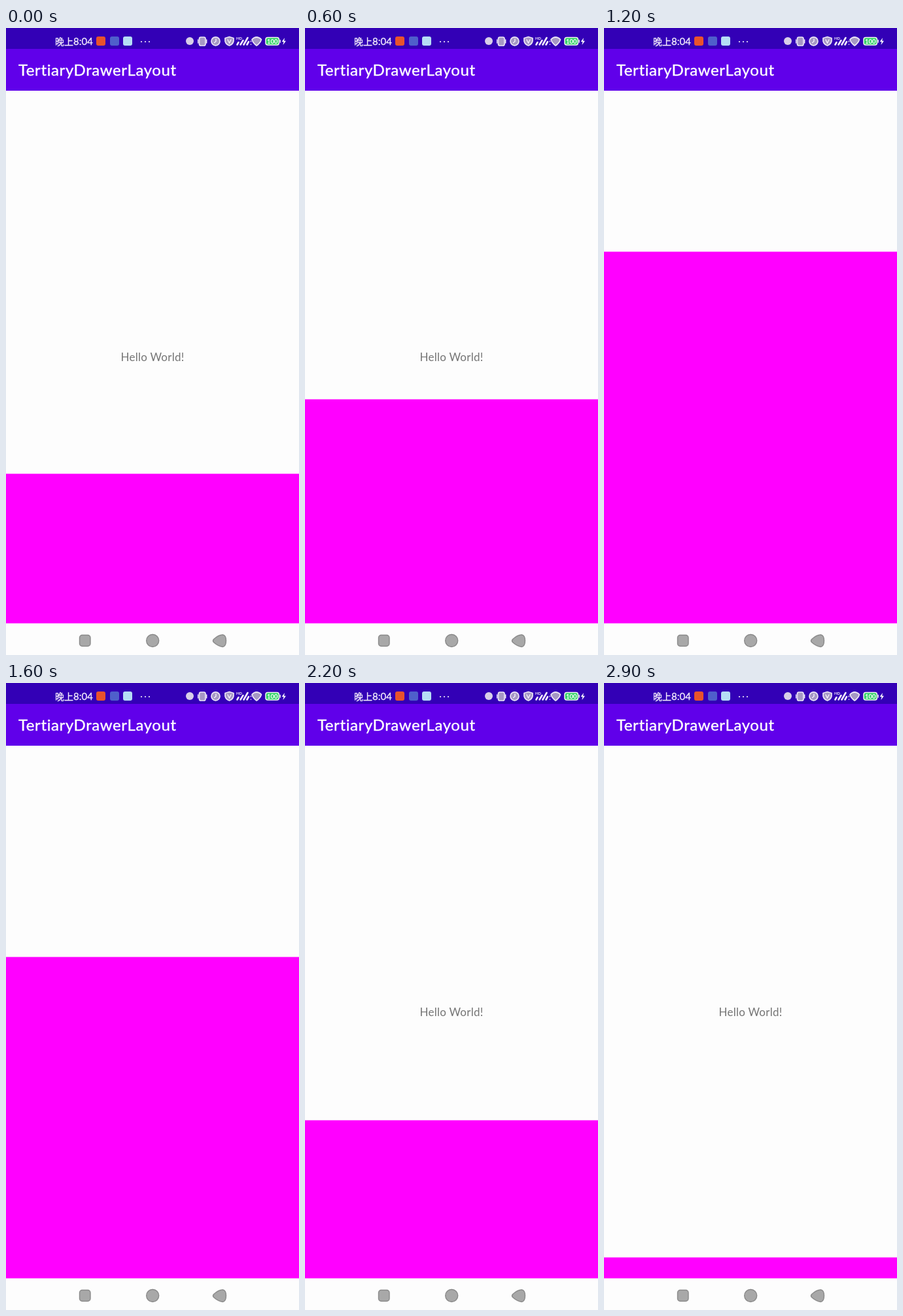
An HTML page for the animation above (3 s loop, 448 by 960 pixels).

```html
<!DOCTYPE html>
<html lang="en">
<head>
<meta charset="utf-8">
<title>TertiaryDrawerLayout</title>
<style>
  html, body { margin: 0; width: 100%; height: 100%; overflow: hidden; background: #fdfdfd; }
  svg { display: block; width: 448px; height: 960px; font-family: Lato, "Noto Sans CJK SC", "Noto Sans CJK", sans-serif; }
  .title { font-size: 24px; letter-spacing: .6px; fill: #fff; stroke: #fff; stroke-width: .4px; }
  .hello { font-size: 17px; letter-spacing: .25px; fill: #757575; text-anchor: middle; }
  .clock { font-size: 15px; fill: #f4effc; stroke: #f4effc; stroke-width: .3px; }
  .icon { fill: #a698c4; stroke: #ece6f7; stroke-width: 1.7; stroke-linejoin: round; }
  .line { fill: none; stroke: #f4effc; stroke-width: 1.4; stroke-linecap: round; }
  .bars { stroke-width: 2.6; }
  .nav { fill: #a8a8a8; stroke: #8a8a8a; stroke-width: 1.4; stroke-linejoin: round; }
</style>
</head>
<body>
<svg viewBox="0 0 448 960">
  <rect width="448" height="960" fill="#fdfdfd"/>
  <text class="hello" x="224" y="510">Hello World!</text>
  <rect id="drawer" y="682.5" width="448" height="229" fill="#f0f"/>

  <rect width="448" height="32" fill="#3300b6"/>
  <rect y="32" width="448" height="64" fill="#6000ea"/>
  <text class="title" x="19" y="73">TertiaryDrawerLayout</text>

  <g id="status">
    <text class="clock" x="75" y="25.5"><tspan font-size="14">晚上</tspan><tspan x="103">8:04</tspan></text>
    <rect x="138" y="13" width="14" height="14" rx="3" fill="#e9532c"/>
    <rect x="159" y="13" width="14" height="14" rx="3" fill="#4f5fcb"/>
    <rect x="179" y="13" width="14" height="14" rx="3" fill="#b5ddf5"/>
    <g fill="#f4effc">
      <circle cx="207" cy="21" r="1.1"/>
      <circle cx="213" cy="21" r="1.1"/>
      <circle cx="219" cy="21" r="1.1"/>
    </g>
    <circle cx="281" cy="20" r="6" fill="#d8cfe8"/>
    <rect class="icon" x="295.5" y="14" width="9.5" height="13" rx="2.5"/>
    <path class="line" d="M293.7 18v5M306.7 18v5"/>
    <circle class="icon" cx="320.5" cy="20.3" r="6.5"/>
    <path class="line" d="M321 17v3.5l-2.5 2"/>
    <path class="icon" d="M341.5 13.5L348 15.5V20Q347 25 341.5 27Q336 25 335 20V15.5Z"/>
    <path class="line" d="M339 18l2.5 5 2.5-5"/>
    <text x="352" y="18" font-size="6" font-weight="700" fill="#f4effc">HD</text>
    <path class="line bars" d="M353.5 25.5l2-3.5M358.5 25.5l4-6.5M363.5 25.5l6-10.5M368.5 25.5l2.5-4.5"/>
    <path class="line" d="M374.5 20v1M374.5 25v.3"/>
    <path class="icon" d="M376 17.5Q383 10.5 390.5 17.5Q389 23 383.2 27Q377.5 23 376 17.5Z"/>
    <rect x="397" y="14.5" width="20.5" height="11.5" rx="3.2" fill="#32d266" stroke="#f1f7f1" stroke-width="1.5"/>
    <path class="line" d="M419.3 18.5v3.5"/>
    <text x="407.2" y="23.8" font-size="9.5" font-weight="700" fill="#fff" text-anchor="middle">100</text>
    <path d="M426 15l-4.2 6h2.7l-1 5 4.5-6.3h-2.8z" fill="#fff"/>
  </g>

  <g id="buttons">
    <rect class="nav" x="112.5" y="929.5" width="16.5" height="17" rx="4"/>
    <circle class="nav" cx="224.2" cy="938" r="9.5"/>
    <path class="nav" d="M317.5 936Q325 929 331.5 929Q336.5 930 336.5 938Q336.5 946.5 331.5 947.5Q325 947 317.5 940.5Q315.5 938.3 317.5 936Z"/>
  </g>
</svg>
<script>
  const LOOP = 3000, STEP = 100, BOTTOM = 911.5;
  const drawer = document.getElementById('drawer');

  // Time, top edge and speed (px/ms) along the drag.
  const path = [
    [0, 683, -0.05], [600, 569, -0.36], [900, 424, -0.39], [1200, 343, 0],
    [1800, 493, 0.38], [2200, 670, 0.4], [2900, 880, 0.2]
  ];

  function topAt(t) {
    let i = 0;
    while (i < path.length - 2 && t > path[i + 1][0]) i++;
    const [t0, y0, v0] = path[i], [t1, y1, v1] = path[i + 1];
    const d = t1 - t0, u = (t - t0) / d, u2 = u * u, u3 = u2 * u;
    return y0 * (2 * u3 - 3 * u2 + 1) + v0 * d * (u3 - 2 * u2 + u)
      + y1 * (3 * u2 - 2 * u3) + v1 * d * (u3 - u2);
  }

  const start = performance.now();
  function draw(now) {
    const t = Math.floor((Math.max(0, now - start) % LOOP) / STEP) * STEP;
    const y = Math.round(topAt(t)) - 0.5;
    drawer.setAttribute('y', y);
    drawer.setAttribute('height', BOTTOM - y);
    requestAnimationFrame(draw);
  }
  draw(start);
</script>
</body>
</html>
```
